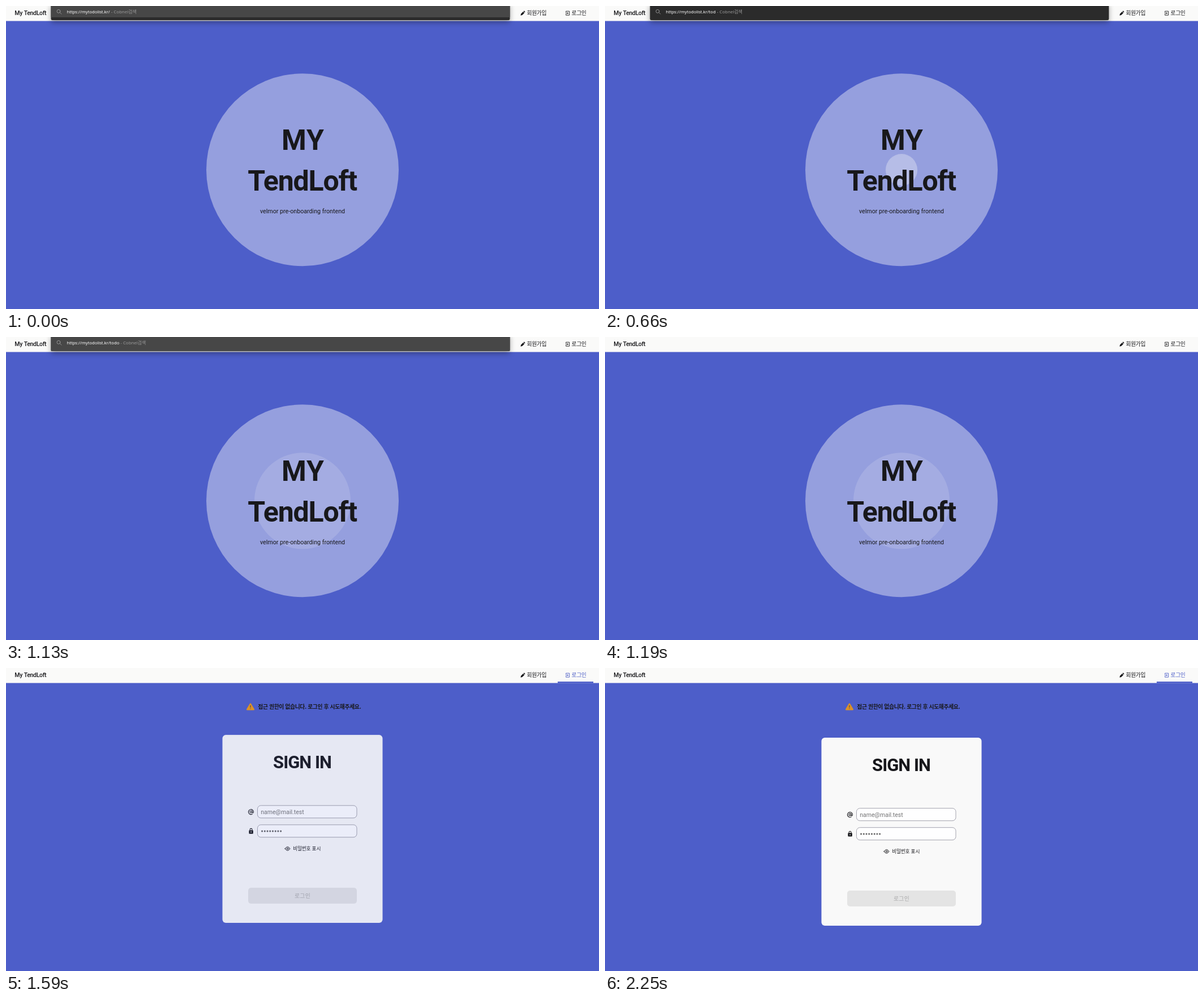
Animation, 1048 px wide and 535 px high, one loop 3810 ms. Source, as an HTML page:

```html
<!DOCTYPE html>
<html lang="ko">
<head>
<meta charset="utf-8">
<title>My TendLoft</title>
<style>
  :root { --blue: #4d5ec9; --paper: #fafaf9; --ink: #18181b; --loop: 3810ms; }
  html, body { margin: 0; width: 100%; height: 100%; overflow: hidden; background: var(--blue); }
  svg.stage { display: block; width: 100vw; height: 100vh; }
  text { fill: var(--ink); font: 400 10.7px Roboto, "Noto Sans CJK KR", "Noto Sans CJK", sans-serif; white-space: pre; }
  .mid { text-anchor: middle; }
  .ko { font-family: "Noto Sans CJK KR", "Noto Sans CJK", sans-serif; font-size: 9.8px; letter-spacing: -.36px; }
  .brand { font-size: 10.5px; font-weight: 500; letter-spacing: -.33px; word-spacing: .8px; }
  .title { font-size: 50px; font-weight: 700; letter-spacing: -1.2px; }
  .title.short { letter-spacing: 1px; }
  .heading { font-size: 31px; font-weight: 700; letter-spacing: -1px; }
  .notice { font-weight: 700; }
  .url, .url tspan { fill: #fff; font-family: "Noto Sans", "Noto Sans CJK KR", sans-serif; font-size: 7.6px; }
  .url .hint { fill: #9b9b9b; font-size: 7.9px; }
  .line { fill: none; stroke: currentColor; stroke-linecap: round; stroke-linejoin: round; }
  .field { fill: #fff; stroke: #a3a3ad; }
  .panel { fill: #2b2b2b; filter: drop-shadow(0 4px 5px rgba(0, 0, 0, .34)); }

  .home, .login, .key, .row { animation: var(--loop) step-end infinite; }
  .home { animation-name: leave; }
  .login { animation-name: enter; }
  @keyframes leave { 0% { visibility: visible } 35.16%, 100% { visibility: hidden } }
  @keyframes enter { 0% { visibility: hidden } 35.16%, 100% { visibility: visible } }

  .ripple { transform-origin: 524px 289.3px; animation: grow var(--loop) linear infinite; }
  @keyframes grow {
    0%, 11.29% { transform: scale(0); opacity: .43 }
    29.66%, 100% { transform: scale(1); opacity: .15 }
  }

  .dropdown { animation: close var(--loop) linear infinite; }
  @keyframes close { 0%, 29.8% { opacity: 1 } 31.22%, 100% { opacity: 0 } }
  .row { animation-name: highlight; }
  @keyframes highlight {
    0% { height: 25px; opacity: 1 }
    8.91% { height: 30px; opacity: 0 }
    26.25%, 100% { height: 30px; opacity: 1 }
  }

  .url .key { font-size: 0; }
  .k1 { animation-name: key1; }
  .k2 { animation-name: key2; }
  .k3 { animation-name: key3; }
  .k4 { animation-name: key4; }
  @keyframes key1 { 0% { font-size: 0 } 8.91%, 100% { font-size: 7.6px } }
  @keyframes key2 { 0% { font-size: 0 } 12.86%, 100% { font-size: 7.6px } }
  @keyframes key3 { 0% { font-size: 0 } 16.27%, 100% { font-size: 7.6px } }
  @keyframes key4 { 0% { font-size: 0 } 19.95%, 100% { font-size: 7.6px } }

  .link { color: var(--ink); animation: tint var(--loop) ease infinite; }
  .link text { fill: currentColor; }
  @keyframes tint { 0%, 35.17% { color: #18181b } 43.04%, 100% { color: #4d5ec9 } }

  .card { animation: settle var(--loop) infinite; }
  @keyframes settle {
    0%, 35.17% { transform: translateY(-9px); opacity: .8; animation-timing-function: ease }
    59.32%, 100% { transform: none; opacity: 1 }
  }
</style>
</head>
<body>
<svg class="stage" viewBox="0 0 1048 535" color="#18181b">
  <rect width="1048" height="535" fill="var(--blue)"/>
  <rect width="1048" height="26.5" fill="var(--paper)"/>

  <text class="brand" x="15.3" y="16.4">My TendLoft</text>
  <path d="M909.4 16.8l.7-3 3.8-3.8 2.3 2.3-3.8 3.8zM914.5 9.4l.7-.6q.5-.4 1 0l1 1q.4.5 0 1l-.6.7z" fill="currentColor"/>
  <text class="ko" x="920.5" y="16.2">회원가입</text>
  <g class="link">
    <path class="line" d="M989.6 11V9.2h6v7h-6v-1.8M989.4 12.7h3.8M991.9 11.2l1.5 1.5-1.5 1.5" stroke-width=".9"/>
    <text class="ko" x="999.5" y="16.2">로그인</text>
  </g>

  <g class="home">
    <circle cx="524" cy="289.3" r="170" fill="var(--paper)" opacity=".416"/>
    <circle class="ripple" cx="524" cy="289.3" r="85" fill="var(--paper)"/>
    <text class="title short mid" x="525" y="253.5">MY</text>
    <text class="title mid" x="523.6" y="325.5">TendLoft</text>
    <text class="mid" x="524" y="365.8">velmor pre-onboarding frontend</text>

    <g class="dropdown">
      <rect class="panel" x="79.5" y="-5" width="811" height="30" rx="2.5"/>
      <rect class="row" x="79.5" y="-5" width="811" height="25" rx="1" fill="#474747"/>
      <path class="line" d="M95.4 11.6l2.6 2.6M96 9.3a3 3 0 1 1-6 0a3 3 0 1 1 6 0" style="stroke: #a5a5a5" stroke-width=".8"/>
      <text class="url" x="107.5" y="13.4">https://mytodolist.kr/<tspan class="key k1">t</tspan><tspan class="key k2">o</tspan><tspan class="key k3">d</tspan><tspan class="key k4">o</tspan><tspan class="hint"> - Cobnel검색</tspan></text>
    </g>
  </g>

  <g class="login">
    <rect x="975" y="24" width="63" height="2.6" fill="var(--blue)"/>
    <path d="M432 63.6l5.6 9.6h-11.2z" fill="#dc9227" stroke="#dc9227" stroke-width="2.8" stroke-linejoin="round"/>
    <path class="line" d="M432 66.2v3.2M432 71.7v.1" stroke-width="1.2" style="stroke: #5a4a50"/>
    <text class="ko notice" x="445.3" y="72.4">접근 권한이 없습니다. 로그인 후 시도해주세요.</text>

    <g class="card">
      <rect x="382.5" y="123" width="283" height="332" rx="6" fill="var(--paper)"/>
      <text class="heading mid" x="523.5" y="182.3">SIGN IN</text>

      <g class="line" stroke-width="1.1">
        <circle cx="433" cy="259" r="1.9"/>
        <path d="M434.9 257v2.4q.1 1.5 1.3 1.5t1.3-1.7a4.5 4.5 0 1 0-2.2 3.7"/>
      </g>
      <rect class="field" x="444.5" y="247.7" width="175.5" height="22" rx="6"/>
      <text x="450.3" y="262.7" style="fill: #757575; font-size: 10.5px">name@mail.test</text>

      <rect x="429.4" y="291.3" width="7.4" height="6.3" rx="1" fill="currentColor"/>
      <path class="line" d="M431.2 291.5v-1.3a1.9 1.9 0 0 1 3.8 0v1.3" stroke-width="1.1"/>
      <circle cx="433.1" cy="294.4" r=".9" fill="var(--paper)"/>
      <rect class="field" x="444.5" y="281.7" width="175.5" height="22" rx="6"/>
      <path d="M452.6 293h33.2" fill="none" stroke="#666" stroke-width="3.1" stroke-linecap="round" stroke-dasharray="0 4.72"/>

      <g class="line" stroke-width="1">
        <path d="M493.2 323.9q4.4-6.8 8.8 0q-4.4 6.8-8.8 0z"/>
        <circle cx="497.6" cy="323.9" r="1.4"/>
      </g>
      <text class="ko" x="507.2" y="327.2" style="font-size: 8.7px; letter-spacing: -.2px">비밀번호 표시</text>

      <rect x="428" y="393" width="192" height="28" rx="5" fill="#e5e5e4"/>
      <text class="ko mid" x="524" y="410.8" style="fill: #a9a9a9; letter-spacing: .3px">로그인</text>
    </g>
  </g>
</svg>
</body>
</html>
```
